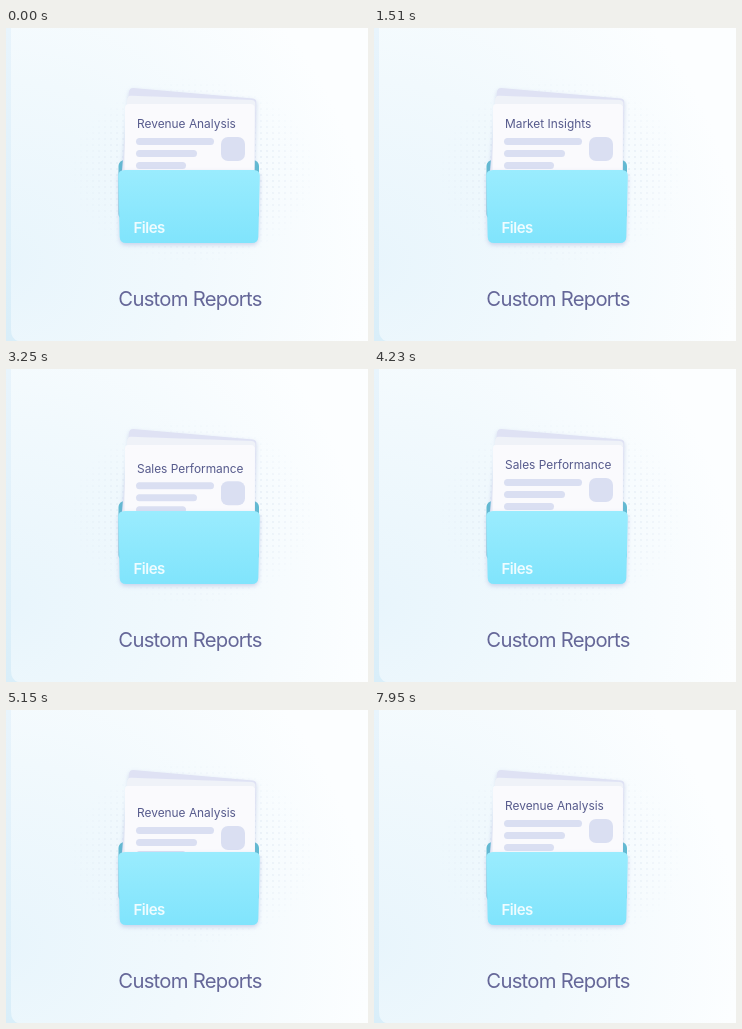
Write an HTML page that moves like this. It is 362x313 px and loops after 8030 ms.

```html
<!DOCTYPE html>
<html lang="en">
<head>
<meta charset="utf-8">
<title>Custom Reports</title>
<style>
  html, body { margin: 0; width: 100%; height: 100%; overflow: hidden; background: #fcfeff; }
  svg { display: block; width: 362px; height: 313px; font-family: Inter, sans-serif; }
  .title { font-size: 11.9px; fill: #565a8c; }
  .bars { fill: #dadff2; }
</style>
</head>
<body>
<svg viewBox="0 0 362 313">
  <defs>
    <radialGradient id="sky" gradientUnits="userSpaceOnUse" cx="0" cy="235" r="365">
      <stop offset="0" stop-color="#e8f5fc"/>
      <stop offset=".5" stop-color="#f1f9fd"/>
      <stop offset="1" stop-color="#fcfeff"/>
    </radialGradient>
    <linearGradient id="edge" x2="0" y2="1">
      <stop offset="0" stop-color="#e8f4fc"/>
      <stop offset="1" stop-color="#d9eef9"/>
    </linearGradient>
    <linearGradient id="pocket" x2="0" y2="1">
      <stop offset="0" stop-color="#9aecfe"/>
      <stop offset="1" stop-color="#80e4fc"/>
    </linearGradient>
    <pattern id="dots" width="6" height="6" patternUnits="userSpaceOnUse">
      <circle cx="3" cy="3" r=".8" fill="#d5e1ee"/>
    </pattern>
    <radialGradient id="fade">
      <stop offset=".5" stop-color="#fff"/>
      <stop offset="1" stop-color="#000"/>
    </radialGradient>
    <mask id="halo"><ellipse cx="188" cy="144" rx="124" ry="94" fill="url(#fade)"/></mask>
    <filter id="soft" x="-20%" y="-20%" width="140%" height="150%">
      <feDropShadow dx="0" dy="2" stdDeviation="2" flood-color="#8d9bd0" flood-opacity=".4"/>
    </filter>
    <clipPath id="opening"><rect x="100" y="50" width="170" height="98"/></clipPath>
  </defs>

  <rect width="362" height="313" fill="url(#edge)"/>
  <path d="M5 0H362V313H12Q5 311 5 301Z" fill="url(#sky)"/>
  <rect width="362" height="313" fill="url(#dots)" mask="url(#halo)"/>

  <rect x="112.5" y="132" width="140.5" height="60" rx="6" fill="#60bbd2"/>
  <path d="M115.5 148L123 64Q123.500 60 127 60L247 70.500Q250.500 71 250.300 74L248 148Z" fill="#dfe2f4" filter="url(#soft)"/>
  <path d="M117 148L121 72Q121.500 67.500 125 67.700L246 72Q249.500 72.500 249.300 76L248 148Z" fill="#eff2f8"/>
  <g id="cards" clip-path="url(#opening)"></g>

  <path d="M119 142H247.500Q254 142 253.800 148L252.300 209Q252 215 246 215H120Q114 215 113.700 209L112.300 148Q112 142 119 142Z" fill="url(#pocket)" filter="url(#soft)"/>
  <text x="127.500" y="205" font-size="15" font-weight="600" letter-spacing="-.5" fill="#effcff">Files</text>
  <text x="184" y="278" font-size="20.300" letter-spacing="-.75" text-anchor="middle" fill="#656798">Custom Reports</text>
</svg>
<script>
const LOOP = 8030, SLIDE = 1230, TRAVEL = 80;
const reports = [
  { title: 'Revenue Analysis', start: -SLIDE },
  { title: 'Market Insights', start: 220 },
  { title: 'Sales Performance', start: 2180 },
  { title: 'Revenue Analysis', start: 4155 },
];

const bar = (y, width) => `<rect x="130" y="${y}" width="${width}" height="7" rx="3.5"/>`;
const card = ({ title }) => `<g>
  <rect x="119" y="76" width="129.500" height="90" rx="4" fill="#fafafd"/>
  <text class="title" x="131" y="100.300">${title}</text>
  <g class="bars">${bar(110, 78)}${bar(122, 61)}${bar(134, 50)}
    <rect x="215" y="109" width="24" height="24" rx="7"/></g>
</g>`;

const stack = document.getElementById('cards');
stack.innerHTML = reports.map(card).join('');

const easeInOut = u => (1 - Math.cos(Math.PI * u)) / 2;

function draw(now) {
  const time = now % LOOP;
  reports.forEach(({ start }, i) => {
    const progress = Math.min(1, Math.max(0, (time - start) / SLIDE));
    const offset = TRAVEL * (1 - easeInOut(progress));
    stack.children[i].setAttribute('transform', `translate(0 ${offset.toFixed(2)})`);
  });
}

const origin = performance.now();
function frame() {
  draw(performance.now() - origin);
  requestAnimationFrame(frame);
}
frame();
</script>
</body>
</html>
```
